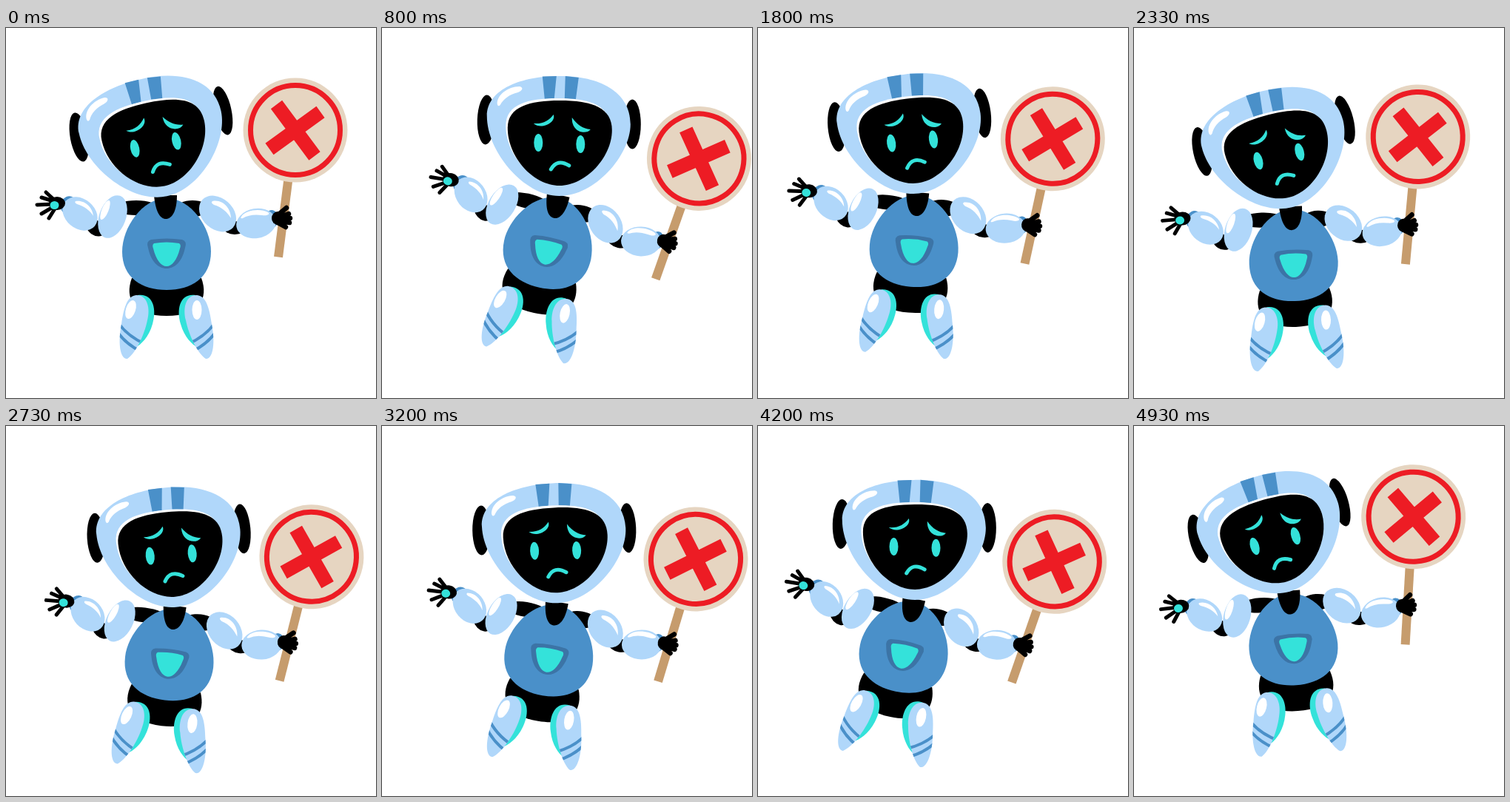
Write an HTML page that moves like this. It is 500x500 px and loops after 4.99 s.

```html
<!DOCTYPE html>
<html lang="en">
<head>
<meta charset="utf-8">
<title>Sad robot with a sign</title>
<style>
  html, body { margin: 0; width: 100%; height: 100%; overflow: hidden; background: #fff; }
  svg { display: block; width: 100vw; height: 100vh; }
  .sky { fill: #b0d7fa; }
  .blue { fill: #4a90c9; }
  .teal { fill: #34e2da; }
  .white { fill: #fff; }
  .line { fill: none; stroke-linecap: round; }
</style>
</head>
<body>
<svg viewBox="0 0 500 500">
  <defs>
    <path id="shin" d="M176 361C192 361 195 380 191 395C187 415 175 440 164 447C154 448 151 425 156 400C159 380 163 362 176 361Z"/>
    <clipPath id="shinClip"><use href="#shin"/></clipPath>
    <path id="face" d="M240 98C285 98 311 108 311 138C311 175 275 213 240 213C205 213 170 175 170 135C170 106 200 98 240 98Z"/>
    <g id="leg">
      <path class="teal" d="M178 361C199 358 204 380 198 400C193 418 182 428 176 431Z"/>
      <use href="#shin" class="sky"/>
      <path class="line" clip-path="url(#shinClip)" stroke="#4a90c9" stroke-width="4" d="M150 396Q163 416 188 427M148 407Q160 426 182 437"/>
    </g>
  </defs>

  <g id="robot">
    <!-- hips and legs -->
    <path d="M170 338C160 365 172 389 217 389C262 389 274 365 264 338Z"/>
    <use href="#leg"/>
    <use href="#leg" transform="matrix(-1 0 0 1 434 0)"/>
    <ellipse class="white" cx="168.500" cy="380.500" rx="6.500" ry="13" transform="rotate(18 168.500 380.500)"/>
    <ellipse class="white" cx="258" cy="381" rx="6.500" ry="13"/>

    <!-- left arm -->
    <ellipse cx="176" cy="243" rx="30" ry="10"/>
    <ellipse cx="252" cy="244" rx="22" ry="11"/>
    <ellipse cx="121" cy="270" rx="14" ry="10" transform="rotate(35 121 270)"/>
    <ellipse class="sky" cx="144" cy="255" rx="18" ry="30" transform="rotate(20 144 255)"/>
    <ellipse class="white" cx="134" cy="246" rx="4.500" ry="14" transform="rotate(22 134 246)"/>
    <ellipse class="blue" cx="84" cy="239" rx="10" ry="12" transform="rotate(25 84 239)"/>
    <ellipse class="sky" cx="100" cy="251" rx="26" ry="20" transform="rotate(40 100 251)"/>
    <path class="white" d="M94 234C106 232 117 242 118 254C114 247 106 241 96 238Q92 236 94 234Z"/>
    <ellipse cx="69" cy="237" rx="11" ry="9"/>
    <path class="line" stroke="#000" stroke-width="5" d="M67 234L54 222M64 234L48 229M63 238L42 239M65 241L48 251M68 241L58 257"/>
    <ellipse class="teal" cx="65.500" cy="239.500" rx="6" ry="5.500"/>

    <!-- torso -->
    <path class="blue" d="M217 230C250 230 277 270 277 302C277 338 250 354 217 354C184 354 157 338 157 302C157 270 184 230 217 230Z"/>
    <path fill="#3c74a6" d="M196 286Q217 283 238 286Q245 288 242 297C238 316 228 325 217 325C206 325 196 316 192 297Q189 288 196 286Z"/>
    <path class="teal" d="M200 291Q217 288 234 291Q237 293 235 298C231 314 224 322 217 322C210 322 203 314 199 298Q197 293 200 291Z"/>
    <path d="M200 226H231C231 248 224 258 216 258C208 258 202 248 200 226Z"/>

    <!-- right arm -->
    <ellipse cx="309" cy="270" rx="15" ry="9"/>
    <ellipse class="sky" cx="286" cy="251" rx="28" ry="21" transform="rotate(42 286 251)"/>
    <path class="white" d="M279 234C293 231 304 244 304 257C299 249 292 242 281 239Q276 236 279 234Z"/>
    <ellipse class="blue" cx="359" cy="258" rx="9" ry="12"/>
    <ellipse class="sky" cx="338" cy="264" rx="27" ry="20" transform="rotate(-10 338 264)"/>
    <path class="white" d="M318 255C324 245 345 244 354 249C358 252 352 254 346 253Q330 251 320 257Q316 258 318 255Z"/>
    <ellipse cx="367" cy="257" rx="8" ry="9"/>

    <!-- sign -->
    <path d="M382 200L368 309.500" stroke="#c69c6d" stroke-width="12"/>
    <circle cx="391" cy="138" r="70.500" fill="#e6d5c1"/>
    <g fill="none" stroke="#ed1c24">
      <circle cx="391" cy="138" r="60.500" stroke-width="7"/>
      <path stroke-width="19" d="M365.500 103.500L417 173M425 113.500L356 163.500"/>
    </g>
    <path class="line" stroke="#000" stroke-width="6.500" d="M366 254L379 243M368 256L382 251M367 258L384 257M368 261L383 263M367 263L378 269"/>

    <!-- head -->
    <g transform="rotate(-12.200 218 311) translate(-5 2)">
      <ellipse cx="141" cy="124" rx="12" ry="33.500" transform="rotate(2 141 124)"/>
      <ellipse cx="338.500" cy="130" rx="11.500" ry="33.500"/>
      <path class="sky" d="M239 65C290 64 336 84 336 130C336 172 288 227 240 227C192 227 142 167 142 119C142 82 190 65 239 65Z"/>
      <path class="blue" d="M217 65.500L236 65L233 95L220 96ZM248 65L266 67L262 97L247 95Z"/>
      <path class="white" d="M156 103C155 91 170 79 186 79C192 80 190 85 184 87C172 90 164 96 160 104Q157 107 156 103Z"/>
      <use href="#face" class="white" transform="translate(-2.500 -3)"/>
      <use href="#face"/>
      <g class="teal">
        <ellipse cx="211.500" cy="155" rx="6" ry="12"/>
        <ellipse cx="268.500" cy="157" rx="6" ry="12"/>
        <path d="M205 129C218 130 226 125 232 117C236 128 215 138 205 129Z"/>
        <path d="M257 121C264 131 272 136 282 137C276 145 256 141 257 121Z"/>
      </g>
      <path class="line" stroke="#34e2da" stroke-width="5" d="M228.500 191Q237 176 253 186"/>
    </g>
  </g>
</svg>

<script>
const LOOP = 4990, STEP = 200 / 3;
const robot = document.getElementById('robot');

// seconds, torso x, torso bottom y, lean in degrees
const poses = [
  [0, 217, 354, 7.7], [.27, 221, 368, 15], [.53, 221, 361, 19.3],
  [.8, 222, 352, 19.9], [1.1, 213, 330, 20.2], [1.33, 196, 338, 19.8],
  [1.6, 191, 352, 17], [1.8, 210, 350, 12.7], [2.2, 216, 364, 4.2],
  [2.33, 216, 369, 5.6], [2.67, 219, 371, 14], [3.2, 224, 365, 17.2],
  [3.47, 224, 352, 19.3], [3.73, 211, 338, 20.2], [4, 192, 342, 20.3],
  [4.2, 195, 360, 19.6], [4.47, 207, 360, 14], [4.8, 216, 337, 6.5],
  [4.93, 216, 350, 3.7], [5, 217, 354, 7.7]
];
const last = poses.length - 1;

function rate(i, k) {
  const a = poses[i], b = poses[i + 1];
  return (b[k] - a[k]) / (b[0] - a[0]);
}

// harmonic mean of neighbouring rates, flat at turning points
function slope(i, k) {
  const a = rate(i === 0 ? last - 1 : i - 1, k);
  const b = rate(i === last ? 0 : i, k);
  return a * b > 0 ? 2 * a * b / (a + b) : 0;
}

function sample(t, k) {
  let i = 0;
  while (i < last - 1 && t >= poses[i + 1][0] - .004) i++;
  const a = poses[i], b = poses[i + 1], h = b[0] - a[0];
  const u = Math.max(0, Math.min(1, (t - a[0]) / h)), v = 1 - u;
  return v * v * (1 + 2 * u) * a[k] + u * u * (3 - 2 * u) * b[k]
    + h * u * v * (v * slope(i, k) - u * slope(i + 1, k));
}

function draw() {
  const ms = performance.now() % LOOP;
  const t = Math.floor((ms + 4) / STEP) * STEP / 1000;
  const [x, y, lean] = [1, 2, 3].map(k => sample(t, k));
  robot.setAttribute('transform',
    `translate(${x - 217} ${y - 354}) rotate(${lean - 7.7} 218 310)`);
  requestAnimationFrame(draw);
}
draw();
</script>
</body>
</html>
```
